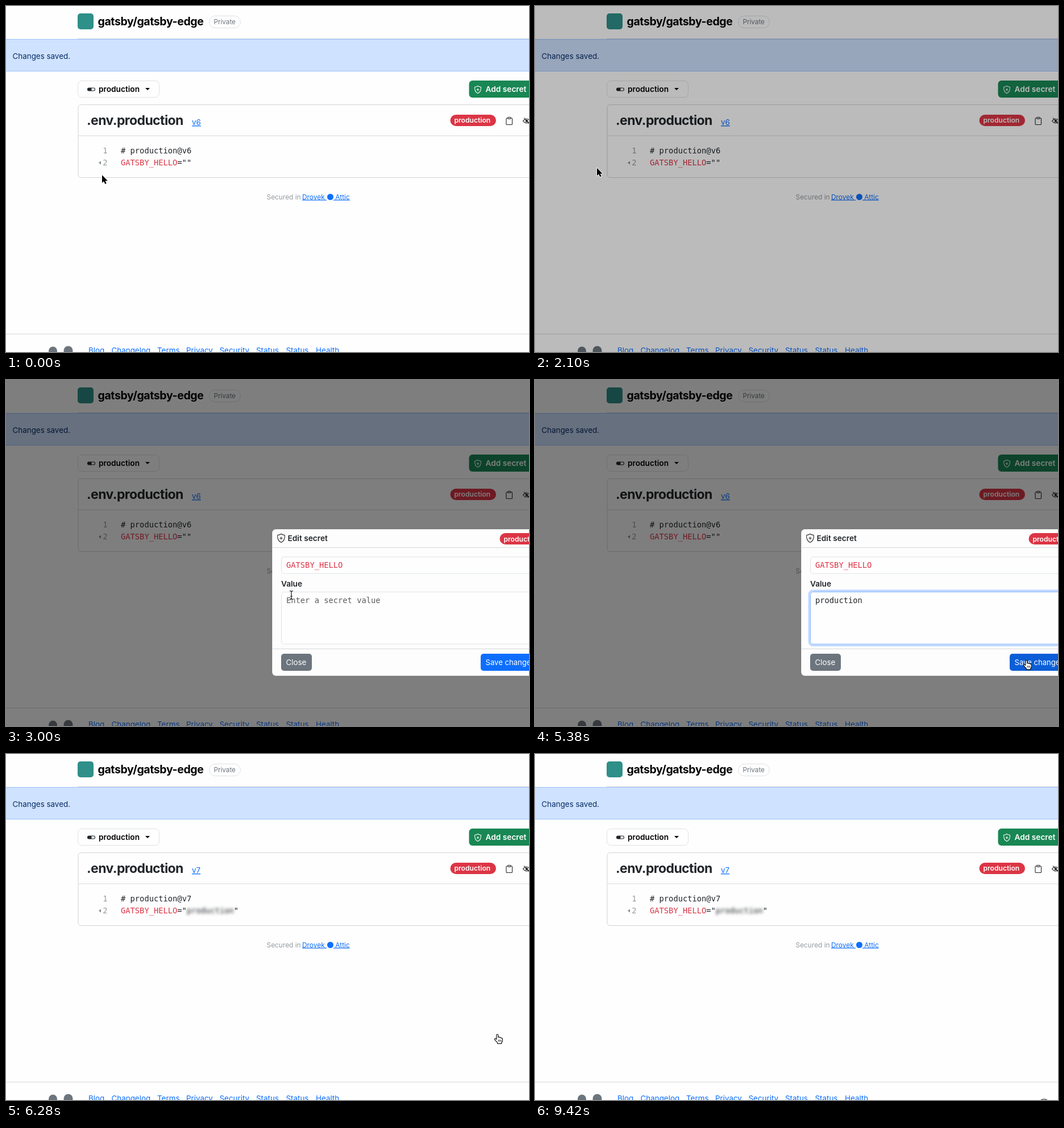
Recreate the animation shown at these times as an HTML page. Size 920 by 608 pixels, loop 9.52 s.

```html
<!DOCTYPE html>
<html lang="en">
<head>
<meta charset="utf-8">
<title>Edit a secret</title>
<style>
  html, body { margin: 0; width: 100%; height: 100%; overflow: hidden; background: #fefefe; }
  svg { display: block; width: 920px; height: 608px; }
  text { font: 13.4px Inter, sans-serif; font-optical-sizing: none; fill: #212529; white-space: pre; }
  .semi { font-weight: 600; font-size: 13.7px; }
  .title { font-weight: 700; font-size: 19.5px; letter-spacing: -.4px; }
  .heading { font-weight: 700; font-size: 23px; letter-spacing: -.6px; }
  .mono { font: 13.75px "DejaVu Sans Mono", monospace; }
  .link { fill: #0d6efd; }
  .under { text-decoration: underline; }
  .small { font-size: 11.9px; }
  .badge { font-size: 12.1px; font-weight: 600; }
  .save { font-size: 13.1px; }
  .black { fill: #000; }
  .navy { fill: #052c65; }
  .white { fill: #fff; }
  .red { fill: #dc3545; }
  .muted { fill: #959a9f; }
  .box { fill: #fefefe; stroke: #d2d4d6; }
  .field { fill: #fefefe; stroke: #dee2e6; }
  .rule { stroke: #d6d8da; fill: none; }
  .icon { fill: none; stroke: #212529; stroke-width: 1.1; stroke-linejoin: round; }
  #save { fill: #0d6efd; }
  #save.hover { fill: #0b5ed7; }
  #save.active { fill: #0a58ca; }
  #halo { fill: none; stroke: #0d6efd; stroke-opacity: .25; stroke-width: 3.5; }
  #value.focus { stroke: #86b7fe; }
  #blurred { filter: blur(2.6px); }
  .pointer { stroke: #fff; stroke-width: 1.8; paint-order: stroke; stroke-linejoin: round; }
</style>
</head>
<body>
<svg viewBox="0 0 920 608">
  <defs>
    <g id="shield">
      <path d="M0-7.5C2-6.2 4-5.6 6.3-5.2C6.8 1 4.5 5.5 0 7.6C-4.5 5.5-6.8 1-6.3-5.2C-4-5.6-2-6.2 0-7.5Z"/>
      <path d="M0-2.6V2.6M-2.6 0H2.6"/>
    </g>
    <path id="beamShape" d="M-3-7.5Q0-7.5 0-5.5V5.5Q0 7.5-3 7.5M3-7.5Q0-7.5 0-5.5M0 5.5Q0 7.5 3 7.5M-1.8 2H1.8"/>
  </defs>

  <g id="page">
    <rect x="126" y="13" width="28" height="28" rx="5" fill="#2f8f89"/>
    <text class="title black" x="161.5" y="34">gatsby/gatsby-edge</text>
    <rect class="field" x="357.5" y="17.5" width="55" height="21" rx="10.5"/>
    <text x="365.5" y="32" style="font-size:11.7px;fill:#6c757d">Private</text>

    <path class="rule" d="M126 57.5H920"/>
    <rect x="-2" y="58.5" width="930" height="56" fill="#cfe2ff" stroke="#9ec5fe"/>
    <text class="navy" x="11.5" y="92.5">Changes saved.</text>

    <rect class="field" x="126.5" y="131.5" width="143" height="29" rx="7"/>
    <rect class="icon" x="143.5" y="144" width="13" height="5" rx="2.5"/>
    <path d="M146 144H150.5V149H146A2.5 2.5 0 0 1 146 144Z" fill="#212529"/>
    <text class="semi black" x="163" y="151">production</text>
    <path d="M245 144H253L249 148Z"/>
    <rect x="814.5" y="131" width="130" height="30" rx="6" fill="#198754"/>
    <use href="#shield" transform="translate(830 147) scale(.86)" fill="none" stroke="#fff" stroke-width="1.2"/>
    <text class="semi white" x="843.5" y="151">Add secret</text>

    <rect class="box" x="127" y="173.5" width="820" height="128" rx="5"/>
    <path class="rule" d="M127 228H920"/>
    <text class="heading" x="142" y="209">.env.production</text>
    <text class="link under version" x="327" y="209">v6</text>
    <rect class="red" x="781.5" y="191" width="80.5" height="20" rx="10"/>
    <text class="badge white" x="788.5" y="205.4">production</text>
    <g class="icon">
      <path d="M882.5 197H881.3Q880 197 880 198.3V207.2Q880 208.5 881.3 208.5H889.2Q890.5 208.5 890.5 207.2V198.3Q890.5 197 889.2 197H888"/>
      <rect x="882.7" y="195.5" width="5.2" height="2.6" rx=".8"/>
      <path d="M909.5 202Q915.5 194.5 922 202Q915.5 209.5 909.5 202Z"/>
      <circle cx="916" cy="202" r="1.8" fill="#212529"/>
      <path d="M911 196.5L921 207.5"/>
    </g>

    <text class="mono muted" x="170.3" y="259">1</text>
    <text class="mono muted" x="170.3" y="280">2</text>
    <path d="M167 272.5V278.5L163 275.5Z" fill="#868c91"/>
    <text class="mono" x="202" y="259"># production@<tspan class="version">v6</tspan></text>
    <text class="mono" x="202" y="280"><tspan class="red">GATSBY_HELLO</tspan>="<tspan id="emptyEnd">"</tspan></text>
    <g id="stored">
      <text id="blurred" class="mono" x="318" y="280">production</text>
      <text class="mono" x="400.8" y="280">"</text>
    </g>

    <text class="small muted" x="458.5" y="339.5">Secured in </text>
    <text class="small link under" x="521" y="339.5">Drovek </text>
    <circle class="link" cx="570.5" cy="335.5" r="5.5"/>
    <text class="small link under" x="576" y="339.5"> Attic</text>

    <path class="rule" d="M0 576.5H920"/>
    <g fill="#6c757d">
      <circle cx="82.5" cy="606" r="7.5"/>
      <circle cx="109.5" cy="605.5" r="8"/>
    </g>
    <g id="footer"></g>
  </g>

  <g id="menu">
    <rect class="box" x="4" y="268" width="156" height="175.5" rx="5"/>
    <rect x="4.5" y="276" width="155.5" height="28.5" fill="#0d6efd"/>
    <text class="white" x="20" y="295">Edit</text>
    <text x="20" y="323.5">Copy Key</text>
    <text class="muted" x="20" y="352">Copy Value</text>
    <path class="rule" d="M4.5 370.5H160"/>
    <text x="20" y="397.5">Edit Advanced</text>
    <text class="red" x="20" y="426">Remove</text>
  </g>

  <rect id="backdrop" width="920" height="608"/>

  <g id="modal">
    <rect x="468" y="262" width="500" height="258" rx="6.5" fill="#fdfdfd" stroke="#000" stroke-opacity=".2"/>
    <use class="icon" href="#shield" x="484" y="278"/>
    <text class="semi" x="495.5" y="283">Edit secret</text>
    <rect class="red" x="868.5" y="269" width="80" height="20" rx="10"/>
    <text class="badge white" x="875.5" y="283.5">production</text>
    <path class="rule" d="M468 294.5H920M468 472.5H920"/>
    <rect class="field" x="484.5" y="311" width="460" height="29" rx="5"/>
    <text class="mono red" x="493" y="330">GATSBY_HELLO</text>
    <text class="semi" x="484" y="362.5">Value</text>
    <rect id="halo" x="482.3" y="370.3" width="464" height="96" rx="6.5"/>
    <rect id="value" class="field" x="484.5" y="372.5" width="460" height="91.5" rx="5"/>
    <text id="typed" class="mono" x="493" y="391.7"></text>
    <rect x="484" y="481" width="54" height="30" rx="5" fill="#6c757d"/>
    <text class="white" x="492.5" y="501">Close</text>
    <rect id="save" x="835" y="481" width="110" height="30" rx="5"/>
    <text class="save white" x="843.5" y="501">Save changes</text>
  </g>

  <g id="cursor">
    <g id="ring" fill="none">
      <circle cx="1.5" cy="2" r="9.7" stroke="#fff" stroke-width="2.4"/>
      <circle cx="1.5" cy="2" r="9.5" stroke="#111" stroke-width="1.2"/>
    </g>
    <path id="arrow" class="pointer" d="M0 0V13.8L3.2 11L5.3 15.8L7.7 14.8L5.6 10.2H9.8Z"/>
    <g id="beam" fill="none">
      <use href="#beamShape" stroke="#fff" stroke-width="2.6"/>
      <use href="#beamShape" stroke="#111" stroke-width="1.2"/>
    </g>
    <g id="hand" fill="#fff" stroke="#111" stroke-width="1.2" stroke-linejoin="round">
      <path d="M-3.2 1.5V-6A1.5 1.5 0 0 1-.2-6V-2.2Q2-3.4 2.6-1.6Q4.6-2.4 5.1-.8Q7.4-1.2 7.4 1V3Q7.4 5.6 5.7 7.2V8.8H-1.5V7.2L-5.8 2.6Q-7.2.6-5.6 0Q-4.6-.4-3.2 1.5Z"/>
      <path d="M.2 2V5.5M2.4 2V5.5M4.6 2V5.5" stroke-width=".9"/>
    </g>
  </g>
</svg>
<script>
  const LOOP = 9520;
  const STEP = 150;
  const STEP_ORIGINS = [8670, 5380, 4490, 0];
  const SECRET = "production";

  // time, x, y
  const PATH = [
    [0, 169, 297], [450, 169, 288], [1200, 169, 287], [1500, 109, 284.5],
    [2250, 109, 284.5], [2850, 500, 374], [3000, 502, 378], [4640, 502, 378],
    [5380, 866, 500], [8080, 866, 500], [8670, 894, 614], [LOOP, 894, 614]
  ];
  const CLICKS = [[450, 750], [1950, 2100], [3150, 3300], [5530, 5680], [9420, LOOP]];
  const FOOTER = [
    [145, "Blog"], [185.5, "Changelog"], [266, "Terms"], [317, "Privacy"],
    [375.5, "Security"], [440, "Status"], [492.5, "Status"], [545, "Health"]
  ];

  const $ = id => document.getElementById(id);
  const clamp = (v, lo = 0, hi = 1) => Math.min(hi, Math.max(lo, v));
  const ramp = (t, start, length) => clamp((t - start) / length);
  const smooth = u => u * u * (3 - 2 * u);
  const easeOut = u => 1 - (1 - u) ** 1.7;
  const within = (t, from, to) => t >= from && t < to;
  const show = (id, on) => { $(id).style.display = on ? "" : "none"; };

  $("footer").innerHTML = FOOTER
    .map(([x, label]) => `<text class="link" x="${x}" y="610">${label}</text>`).join("");

  function snap(t) {
    const origin = STEP_ORIGINS.find(o => t >= o);
    return origin + Math.floor((t - origin) / STEP) * STEP;
  }

  function cursorAt(t) {
    const i = PATH.findIndex(p => p[0] > t);
    const [t0, x0, y0] = PATH[i - 1];
    const [t1, x1, y1] = PATH[i];
    const u = smooth((t - t0) / (t1 - t0));
    return [x0 + (x1 - x0) * u, y0 + (y1 - y0) * u];
  }

  function drawCursor(t) {
    const beam = within(t, 2850, 5240);
    const hand = within(t, 5380, 8230);
    $("cursor").setAttribute("transform", `translate(${cursorAt(t)})`);
    show("beam", beam);
    show("hand", hand);
    show("arrow", !beam && !hand);
    show("ring", CLICKS.some(([from, to]) => within(t, from, to)));
  }

  function drawModal(t) {
    const opening = 2169, closing = 5930;
    const slide = easeOut(ramp(t, opening, 300)) - easeOut(ramp(t, closing, 300));
    const opacity = ramp(t, opening, 150) - ramp(t, closing, 150);
    const focused = within(t, 3150, 5530);
    const count = clamp(Math.ceil((t - 3500) / 100), 0, SECRET.length);

    $("backdrop").style.opacity = .5 * (ramp(t, 2020, 150) - ramp(t, 6080, 150));
    $("modal").style.opacity = opacity;
    $("modal").setAttribute("transform", `translate(0 ${-50 * (1 - slide)})`);
    show("modal", opacity > 0);
    show("halo", focused);
    $("value").classList.toggle("focus", focused);
    $("typed").textContent = count ? SECRET.slice(0, count) : "Enter a secret value";
    $("typed").style.fill = count ? "#212529" : "#595c5f";
    $("save").classList.toggle("hover", t >= 5380);
    $("save").classList.toggle("active", within(t, 5530, 5680));
  }

  function drawPage(t) {
    const saved = t >= 6200;
    document.querySelectorAll(".version").forEach(el => { el.textContent = saved ? "v7" : "v6"; });
    show("emptyEnd", !saved);
    show("stored", saved);
    show("menu", within(t, 600, 2100));
  }

  let start;
  function tick(now) {
    start ??= now;
    const t = snap((now - start) % LOOP);
    drawPage(t);
    drawModal(t);
    drawCursor(t);
    requestAnimationFrame(tick);
  }
  requestAnimationFrame(tick);
</script>
</body>
</html>
```
